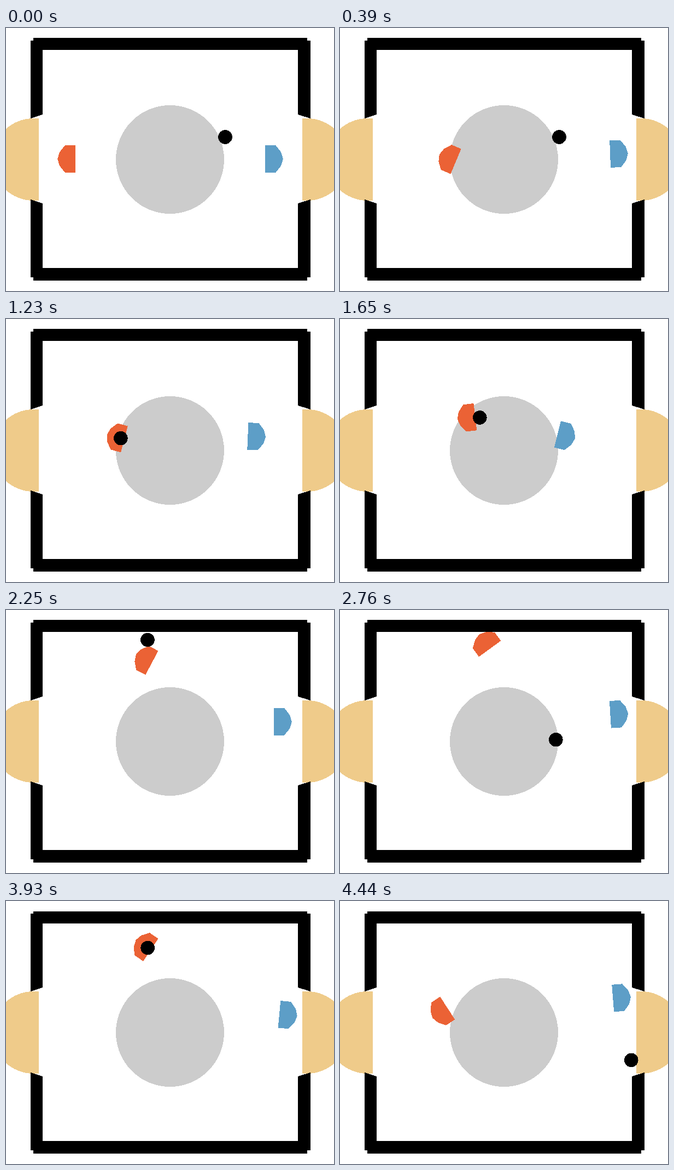
Recreate the animation shown at these times as an HTML page. Size 600x480 px, loop 4470 ms.

```html
<!DOCTYPE html>
<html lang="en">
<head>
<meta charset="utf-8">
<title>Air hockey</title>
<style>
  html, body { margin: 0; width: 100%; height: 100%; overflow: hidden; background: #fff; }
  svg { display: block; width: 600px; height: 480px; }
  .racket { stroke-width: 1.6; }
</style>
</head>
<body>
<svg viewBox="0 0 600 480" shape-rendering="crispEdges">
  <circle cx="300" cy="240" r="99" fill="#ccc"/>
  <g fill="#efcb8a">
    <path d="M60 165H50A75 75 0 0 0 50 315H60Z"/>
    <path d="M542 165H551A75 75 0 0 1 551 315H542Z"/>
  </g>
  <path d="M45 23H67V158L45 165Z"/>
  <path d="M45 313L67 320V455H45Z"/>
  <path d="M557 23H534V158L557 165Z"/>
  <path d="M557 313L534 320V455H557Z"/>
  <rect x="50" y="438" width="501" height="23"/>
  <rect id="topWall" x="50" y="18" width="501" height="22"/>
  <polygon id="red" class="racket" fill="#eb6235" stroke="#eb6235"/>
  <polygon id="blue" class="racket" fill="#5d9ec7" stroke="#5d9ec7"/>
  <circle id="puck" r="12.8"/>
</svg>
<script>
const LOOP = 4470, STEP = 30, WALL_HIT = 3600;
const SHOT_SPEED = 0.83; // px per ms
const $ = id => document.getElementById(id);

const outline = [[-12, 24], [6, 24], [6, -24], [-12, -24], [-21.6, -12], [-25.2, 0], [-21.6, 12]];

// Key poses: time, x, y, degrees
const red = { id: 'red', dir: 1, keys: [
  [0, 120.3, 239, 0], [540, 245, 242, 34], [750, 270.9, 244.8, 45], [1380, 198, 207, 5],
  [1650, 240.6, 179.4, -6.8], [2250, 260.8, 93.3, 28], [2505, 271, 65, 54.2],
  [2760, 270.2, 65.3, 54], [3390, 269.6, 117, 23], [3780, 263, 78, 24],
  [4032, 252, 101, 34], [4440, 191, 199.2, -33]
] };
const blue = { id: 'blue', dir: -1, keys: [
  [0, 480.9, 239, 0], [540, 502, 225, -4], [750, 453.2, 218.8, -10.4], [990, 412, 215, -3],
  [1290, 453, 214, 4], [1650, 404.6, 212, 14], [2100, 506, 201, 3], [2250, 496.8, 204, 1],
  [2760, 501.2, 190.4, -3.5], [3390, 506.6, 228.8, 11.8], [4440, 506, 177, -4.6]
] };

// Index of the last entry that has begun
const current = (list, t) => Math.max(0, list.findLastIndex(entry => entry[0] <= t));

// Smooth cubic through the key poses
function pose({ keys }, t) {
  const i = Math.min(current(keys, t), keys.length - 2);
  const a = keys[i], b = keys[i + 1], span = b[0] - a[0], u = (t - a[0]) / span;
  const slope = (k, c) => {
    if (k === 0) return 0;
    const p = keys[k - 1], n = keys[k + 1] || keys[k];
    return (n[c] - p[c]) / (n[0] - p[0]);
  };
  return [1, 2, 3].map(c =>
    a[c] * (1 + 2 * u) * (1 - u) ** 2 + b[c] * u * u * (3 - 2 * u) +
    span * (slope(i, c) * u * (1 - u) ** 2 - slope(i + 1, c) * u * u * (1 - u)));
}

// Mirror a coordinate back into the rink
const reflect = (v, low, high) => v < low ? 2 * low - v : v > high ? 2 * high - v : v;

function fly(x, y, vx, vy, dt) {
  const py = reflect(y + vy * dt, 53, 425), px = x + vx * dt;
  const inMouth = py > 158 && py < 321 && px < 557;
  return [inMouth ? px : reflect(px, 79, 521), py];
}

// Ways the puck moves, each a function of time and of when it began
const gliding = (x, y, vx, vy) => (t, t0) => fly(x, y, vx, vy, t - t0);
const carried = racket => t => pose(racket, t);
const shot = racket => (t, t0) => {
  const [x, y, angle] = pose(racket, t0), a = angle * Math.PI / 180;
  const v = SHOT_SPEED * racket.dir;
  return fly(x, y, v * Math.cos(a), v * Math.sin(a), t - t0);
};

const play = [
  [0, gliding(401, 199, 0, 0)],
  [900, carried(blue)], [990, shot(blue)],
  [1215, carried(red)], [1629, shot(red)],
  [1905, gliding(468, 158, -0.606, -0.3)],
  [2280, carried(red)], [2505, shot(red)],
  [3510, carried(red)], [4032, shot(red)]
];

function place(id, [x, y], angle = 0) {
  $(id).setAttribute('transform', `translate(${x} ${y}) rotate(${angle})`);
}

function draw(t) {
  for (const racket of [red, blue]) {
    const p = pose(racket, t);
    place(racket.id, p, p[2]);
  }
  const [began, move] = play[current(play, t)];
  place('puck', move(t, began));
  $('topWall').setAttribute('y', t < WALL_HIT ? 18 : 19);
}

for (const { id, dir } of [red, blue])
  $(id).setAttribute('points', outline.map(([x, y]) => [x * dir, y]).join(' '));

const start = performance.now();
function tick() {
  const t = (performance.now() - start) % LOOP;
  draw(Math.floor(t / STEP) * STEP);
  requestAnimationFrame(tick);
}
tick();
</script>
</body>
</html>
```
